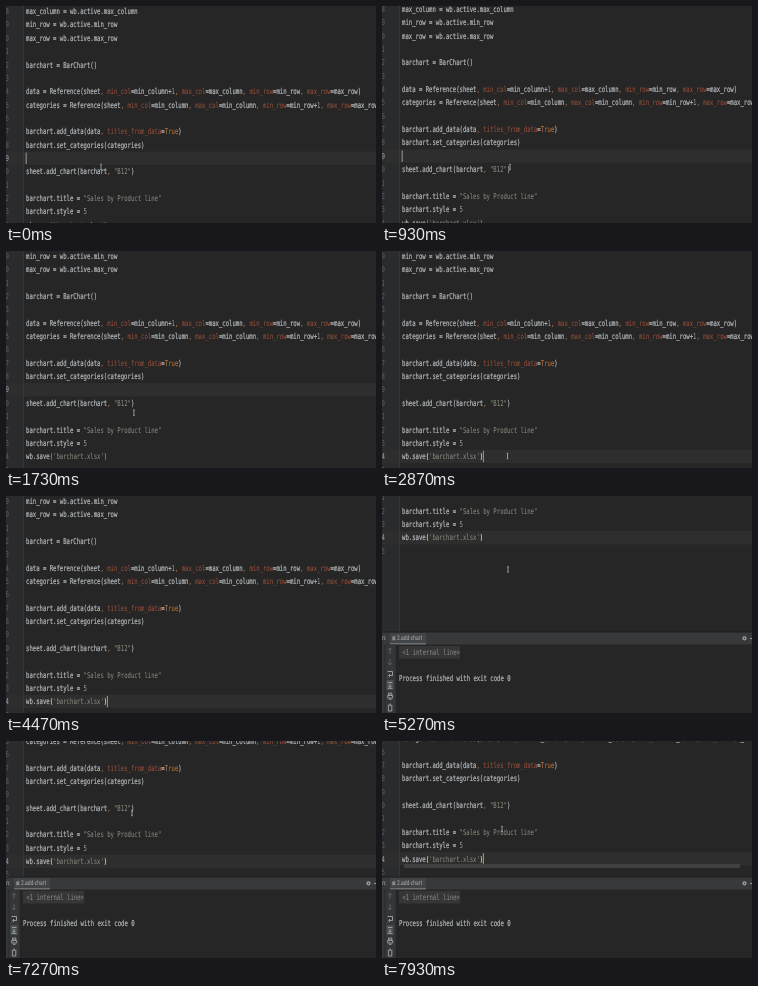
An HTML page that plays this animation: 370 by 217 pixels, repeating every 8 s.

```html
<!DOCTYPE html>
<html lang="en">
<head>
<meta charset="utf-8">
<title>Bar chart script</title>
<style>
html, body { margin: 0; width: 100%; height: 100%; overflow: hidden; background: #262626; }
svg { display: block; width: 100%; height: 100%; }
text { white-space: pre; text-rendering: geometricPrecision; }
.mono text { font: 8px "DejaVu Sans Mono", "Noto Sans Mono", monospace; fill: #b6babd; stroke: #b6babd; stroke-width: .22; }
.mono tspan, .mono .num { stroke: none; }
.mono .num { fill: #5d6062; }
.mono .num.on { fill: #a8a8a8; }
.mono .kw { fill: #a0513a; }
.mono .lit { fill: #c87a42; }
.mono .str { fill: #8c9282; }
.mono .int { fill: #95a3ae; }
.mono .br { fill: #b6babd; }
.mono.match .br { fill: #f0e45a; font-weight: bold; }
.ui { font: 6.6px Roboto, "Open Sans", sans-serif; fill: #b0b0b0; }
.icon { fill: none; stroke: #a2a5a7; stroke-width: .9; }
.dim { stroke: #5f6365; }
</style>
</head>
<body>
<svg viewBox="0 0 370 217" preserveAspectRatio="none">
  <rect width="370" height="217" fill="#262626"/>
  <rect width="17.5" height="217" fill="#2a2b2c"/>
  <rect id="row" width="370" height="13.3" fill="#2e2e2e"/>
  <path d="M17.5 0V217" stroke="#383a3b" stroke-width=".8"/>
  <g id="code" class="mono"></g>
  <rect id="caret" width=".9" height="11.4" fill="#a8a8a8"/>
  <rect id="bar" x="22" y="123" width="336" height="4" fill="#404040"/>
  <g id="panel">
    <rect y="136" width="370" height="81" fill="#262626"/>
    <rect y="136" width="370" height="12.5" fill="#37393b"/>
    <path d="M0 136H370" stroke="#1e1f20"/>
    <rect x="8" y="137" width="36" height="11" fill="#424547"/>
    <path d="M8 147.7H44" stroke="#6b6f72" stroke-width="1.4"/>
    <rect y="148.5" width="14" height="69" fill="#343638"/>
    <path d="M3 149V217M14 149V217" stroke="#292a2b" stroke-width=".8"/>
    <g class="ui">
      <text transform="translate(-5.5 144.3) scale(.75 1)">Run:</text>
      <text transform="translate(15 144.3) scale(.75 1)">2.add-chart</text>
    </g>
    <rect x="10.3" y="140.3" width="3" height="4" fill="#858c91"/>
    <circle class="icon" cx="362.5" cy="142.3" r="1.5" style="stroke-width:1.3"/>
    <path class="icon" d="M368 142.5H370"/>
    <rect x="4.5" y="184" width="7" height="10" fill="#4b4e50"/>
    <path class="icon dim" d="M8 158V152M6.2 154.2L8 152L9.8 154.2M8 163V169M6.2 166.8L8 169L9.8 166.8"/>
    <path class="icon" d="M5.6 175.5H10.5V179.5H7M8 178L6.6 179.5L8 181M5.6 181.5H6
      M5.8 186.5H10.4M8 188V191M6.5 189.8L8 191.4L9.5 189.8M5.8 192.3H10.4"/>
    <path class="icon" d="M6.6 197H9.8V199H6.6ZM5.7 199.5H10.6V202H5.7ZM6.8 203.3H9.6"/>
    <path class="icon" d="M5.8 209.3H10.4M7.2 208.2H9M6.4 210V215H9.8V210"/>
    <rect x="17" y="150" width="61" height="12.5" fill="#363636"/>
    <g class="mono">
      <text transform="translate(20.4 158.6) scale(.7025 1)" style="fill:#8c8c8c;stroke:none">&lt;1 internal line&gt;</text>
      <text id="done" transform="translate(17 184.8) scale(.7025 1)">Process finished with exit code 0</text>
    </g>
  </g>
  <path id="mouse" d="M-.8 -2.7H.8M0 -2.7V2.7M-.8 2.7H.8" fill="none" stroke="#b4b4b4" stroke-width=".8"/>
</svg>
<script>
const LOOP = 8000, STEP = 13.35, CHAR = 3.383, LEFT = 20, FIRST = 8;
const SQUEEZE = .7025;
const RUN = 4670, CLICK = 2270;
const lines = `max_column = wb.active.max_column
min_row = wb.active.min_row
max_row = wb.active.max_row

barchart = BarChart()

data = Reference(sheet, min_col=min_column+1, max_col=max_column, min_row=min_row, max_row=max_row)
categories = Reference(sheet, min_col=min_column, max_col=min_column, min_row=min_row+1, max_row=max_row)

barchart.add_data(data, titles_from_data=True)
barchart.set_categories(categories)

sheet.add_chart(barchart, "B12")

barchart.title = "Sales by Product line"
barchart.style = 5
wb.save('barchart.xlsx')
`.split("\n");
const SAVE = 16, BLANK = 11;

// [time, value...] keys, eased between neighbours
const scrollKeys = [[0, 5.4], [830, 5.4], [1200, -6.1], [1670, -8.1], [RUN - 1, -8.1],
  [RUN, -171.9], [6510, -171.9], [7270, -93.2], [7400, -93.2], [7900, -95.8]];
const mouseKeys = [[0, 95, 161], [70, 95, 161], [600, 128, 161], [1700, 128, 161], [2130, 122, 205],
  [2600, 122, 205], [2870, 125.5, 205], [3900, 125.5, 205], [4430, 336, -6], [RUN - 1, 336, -6],
  [RUN, 126, 73.5], [6530, 126, 73.5], [7270, 126, 72], [7400, 126, 72], [7900, 120, 88]];
const caretOn = [[0, 400], [870, 1400], [1900, 2600], [2850, 3470], [3930, 5050],
  [5550, 6060], [6550, 7050], [7550, LOOP]];

const $ = id => document.getElementById(id);
const ease = p => p * p * (3 - 2 * p);
const show = (id, on) => $(id).setAttribute("visibility", on ? "visible" : "hidden");

function at(keys, t) {
  const n = keys.findIndex(k => k[0] > t);
  if (n < 0) return keys[keys.length - 1].slice(1);
  const a = keys[n - 1], b = keys[n];
  const p = ease((t - a[0]) / (b[0] - a[0]));
  return a.slice(1).map((v, i) => v + (b[i + 1] - v) * p);
}

function colour(line, isSave) {
  const rule = isSave ? /(["'].*?["'])|([()])/g : /(["'].*?["'])|(\w+(?==))|(True|,)|\b(\d+)\b/g;
  const names = isSave ? ["str", "br"] : ["str", "kw", "lit", "int"];
  return line.replace(rule, (s, ...groups) =>
    `<tspan class="${names[groups.findIndex(g => g)]}">${s}</tspan>`);
}

const label = (x, y, cls, body) =>
  `<text class="${cls}" transform="translate(${x} ${y}) scale(${SQUEEZE} 1)">${body}</text>`;

$("code").innerHTML = lines.map((line, i) => {
  const y = i * STEP + 2.7;
  return label(-.6, y, "num", (FIRST + i) % 10) + label(LEFT, y, "", colour(line, i === SAVE));
}).join("");
const nums = document.querySelectorAll(".num");

function draw(t) {
  const [top] = at(scrollKeys, t), [mx, my] = at(mouseKeys, t);
  const current = t < CLICK ? BLANK : SAVE;
  const y = top + current * STEP;
  $("code").setAttribute("transform", `translate(0 ${top})`);
  $("code").classList.toggle("match", current === SAVE);
  nums.forEach((n, i) => n.classList.toggle("on", i === current));
  $("row").setAttribute("y", y - STEP / 2);
  $("caret").setAttribute("x", LEFT + lines[current].length * CHAR - .3);
  $("caret").setAttribute("y", y - 5.7);
  $("mouse").setAttribute("transform", `translate(${mx} ${my})`);
  show("caret", caretOn.some(([a, b]) => t >= a && t < b));
  show("panel", t >= RUN);
  show("done", t >= 4930);
  show("bar", t >= 7400);
}

function tick(now) {
  draw(now % LOOP);
  requestAnimationFrame(tick);
}
draw(0);
requestAnimationFrame(tick);
</script>
</body>
</html>
```
